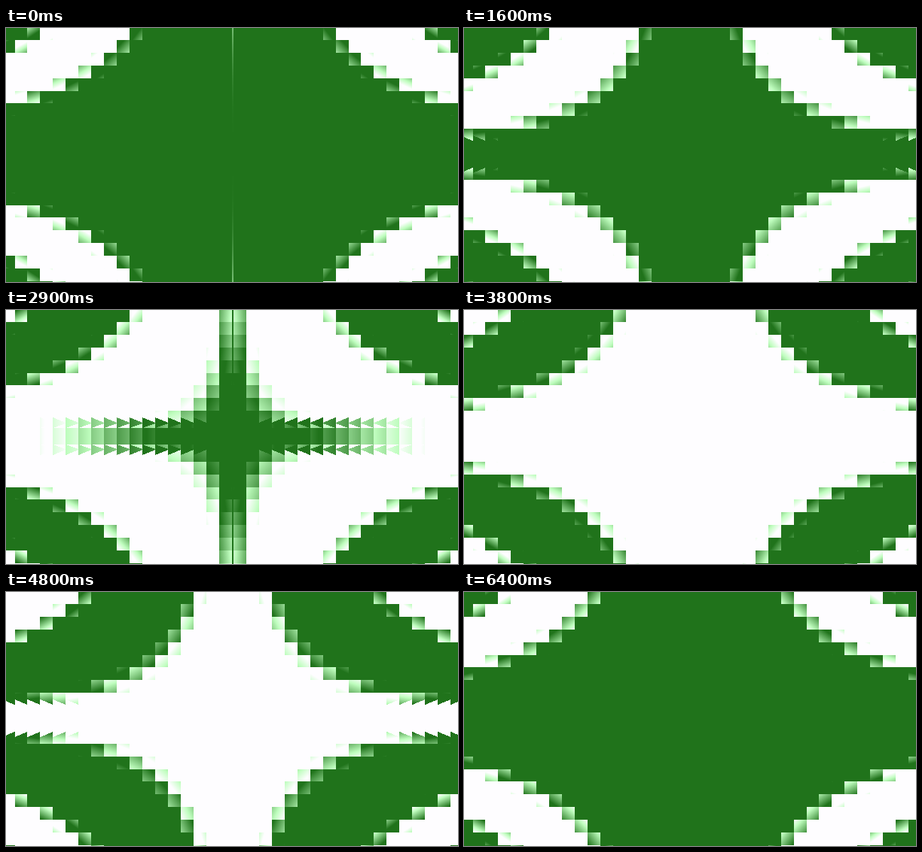
These frames come from a looping animation (600 px wide and 338 px high, 6.5 s). An HTML page with a canvas:

```html
<!DOCTYPE html>
<html lang="en">
<head>
<meta charset="utf-8">
<title>Hyperbolic tile waves</title>
<style>
  html, body { margin: 0; width: 100%; height: 100%; overflow: hidden; background: #20731b; }
  canvas { display: block; width: 100%; height: 100%; }
</style>
</head>
<body>
<canvas id="stage" width="600" height="338"></canvas>
<script>
const W = 600, H = 338;
const CELL_W = 16.97, CELL_H = 16.89;
const CENTER_X = 300.9, CENTER_Y = 168, SEAM = 0.9;
const LOOP = 6500, STEP = 100;
const WAVE = 26.8, SOFTNESS = 0.28, SLOPE = 0.35;

const ctx = document.getElementById('stage').getContext('2d');
const image = ctx.createImageData(W, H);
const pixels = new Uint32Array(image.data.buffer);
const field = new Float32Array(W * H);

// Phase of the wave at a pixel: a product of tile coordinates.
// Inside a tile the phase runs backwards, which keeps its edges crisp.
function phaseAt(px, py) {
  const dx = Math.abs(px + 0.5 - CENTER_X), dy = Math.abs(py + 0.5 - CENTER_Y);
  const x = Math.max(0, dx - SEAM) / CELL_W, y = dy / CELL_H;
  const col = Math.floor(x), row = Math.floor(y);
  const u = x - col, v = y - row;

  // The middle row has a toothed rim that overlaps its neighbours, and notches inside it.
  if (dy < 18 + 7 * u) {
    const notch = dy > 11 && dy < 11 + 6 * (1 - u);
    return (col + 1 - 1.2 * (u - 0.5)) * (notch ? 1.5 : 0.95) / WAVE;
  }
  // Hairline along the vertical axis.
  if (dx < 1) return -0.003 * y ** 3 / WAVE;
  return (col + 1 - SLOPE * (u - 0.5)) * (row + 1.5 - SLOPE * (v - 0.5)) / WAVE;
}

for (let y = 0; y < H; y++) {
  for (let x = 0; x < W; x++) field[y * W + x] = phaseAt(x, y);
}

// Colour ramp from dark green through mint to white.
const ramp = Uint32Array.from({ length: 256 }, (_, i) => {
  const s = i / 255;
  const r = Math.round(32 + 222 * s);
  const g = Math.round(115 + 138 * Math.min(1, 1.4 * s));
  const b = Math.round(27 + 228 * s);
  return (255 << 24 | b << 16 | g << 8 | r) >>> 0;
});

let shown = -1;

function draw(now) {
  const tick = Math.floor((now % LOOP) / STEP);
  if (tick === shown) return;
  shown = tick;
  const t = tick * STEP / 1000;
  for (let i = 0; i < field.length; i++) {
    const level = -Math.sin(field[i] + t) / SOFTNESS;
    pixels[i] = ramp[Math.round(255 * Math.min(1, Math.max(0, level)))];
  }
  ctx.putImageData(image, 0, 0);
}

const start = performance.now();
function loop() {
  draw(performance.now() - start);
  requestAnimationFrame(loop);
}
loop();
</script>
</body>
</html>
```
